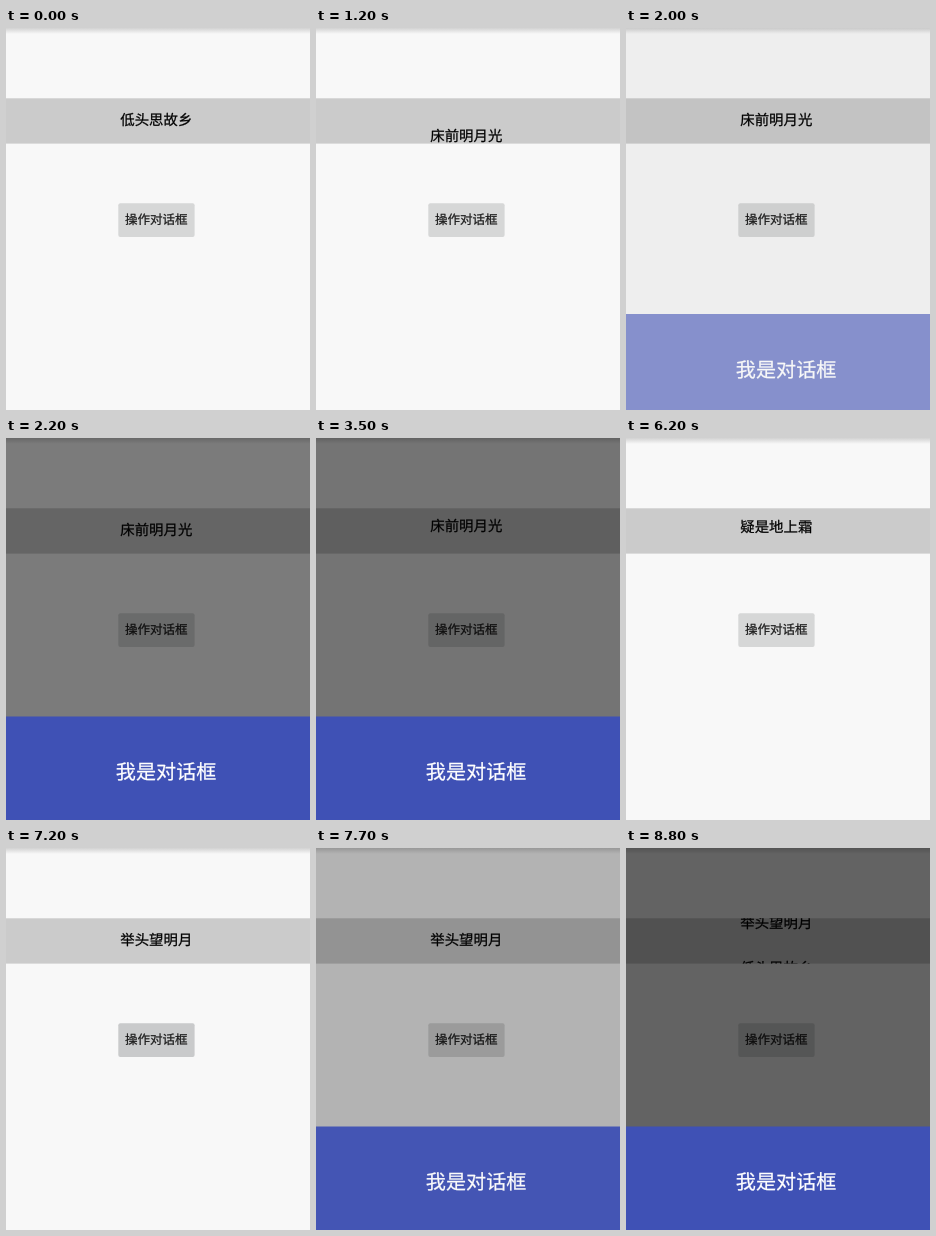
An HTML page with a canvas that plays this animation: 304 by 382 pixels, repeating every 8.9 s.

```html
<!DOCTYPE html>
<html lang="zh-CN">
<head>
<meta charset="utf-8">
<title>对话框</title>
<style>
html, body { margin: 0; width: 100%; height: 100%; overflow: hidden; background: #f8f8f8; }
canvas { display: block; width: 304px; height: 382px; }
</style>
</head>
<body>
<canvas id="stage"></canvas>
<script>
const W = 304, H = 382, LOOP = 8900, TICK = 100;
const BAND = { y: 70.3, h: 45.3 };
const LINES = ['低头思故乡', '床前明月光', '疑是地上霜', '举头望明月'];
const SCROLLS = [[630, 1490], [3425, 4200], [6133, 6990], [8670, 9003]];
const PRESSES = [[1600, 1900], [7200, 7500]];
const DIALOGS = [[1900, 3500], [7500, Infinity]];

// Keys: time since the phase began, dim, dialog opacity, dialog offset
const ENTER = [[-100, 0, 0, 20], [0, 0.01, 0.15, 16], [100, 0.04, 0.594, 7.5],
  [200, 0.28, 0.95, 0], [300, 0.5, 1, 0], [400, 0.6, 1, 0]];
const LEAVE = [[0, 0.53, 1, 0], [100, 0.38, 0.75, 4], [200, 0.2, 0.25, 12],
  [300, 0.07, 0, 20], [400, 0, 0, 20]];

const ratio = window.devicePixelRatio || 1;

function setup(canvas) {
  canvas.width = W * ratio;
  canvas.height = H * ratio;
  const c = canvas.getContext('2d');
  c.scale(ratio, ratio);
  return c;
}

const ctx = setup(document.getElementById('stage'));
const layer = setup(document.createElement('canvas'));

const clamp = v => Math.max(0, Math.min(1, v));

function sample(keys, t) {
  if (t <= keys[0][0]) return keys[0].slice(1);
  for (let i = 1; i < keys.length; i++) {
    const a = keys[i - 1], b = keys[i];
    if (t <= b[0]) {
      const p = (t - a[0]) / (b[0] - a[0]);
      return a.slice(1).map((v, k) => v + (b[k + 1] - v) * p);
    }
  }
  return keys[keys.length - 1].slice(1);
}

function rect(c, x, y, w, h, color) {
  c.fillStyle = color;
  c.fillRect(x, y, w, h);
}

// A hairline outline gives the glyphs a slightly heavier weight
function text(c, str, x, y, size, color) {
  c.font = `${size}px "Noto Sans CJK SC", "Noto Sans CJK", sans-serif`;
  c.textRendering = 'geometricPrecision';
  c.textAlign = 'center';
  c.textBaseline = 'alphabetic';
  c.lineJoin = 'round';
  c.lineWidth = 0.25;
  c.fillStyle = c.strokeStyle = color;
  c.fillText(str, x, y + size * 0.38);
  c.strokeText(str, x, y + size * 0.38);
}

function drawTop() {
  const shade = ctx.createLinearGradient(0, 0, 0, 6);
  shade.addColorStop(0, '#d2d2d2');
  shade.addColorStop(1, '#f8f8f8');
  rect(ctx, 0, 0, W, 6, shade);
}

function drawBand(t) {
  const pos = SCROLLS.reduce((sum, [a, b]) => sum + clamp((t - a) / (b - a)), 0);
  const index = Math.floor(pos), shift = (pos - index) * BAND.h;
  rect(ctx, 0, BAND.y, W, BAND.h, '#cbcbcb');
  ctx.save();
  ctx.beginPath();
  ctx.rect(0, BAND.y, W, BAND.h);
  ctx.clip();
  for (let i = 0; i < 2; i++) {
    const line = LINES[(index + i) % LINES.length];
    text(ctx, line, 150.3, 91.8 - shift + i * BAND.h, 14.4, '#000');
  }
  ctx.restore();
}

function drawButton(t) {
  const pressed = PRESSES.some(([a, b]) => t >= a && t < b);
  ctx.fillStyle = pressed ? '#c9cacb' : '#d6d7d7';
  ctx.beginPath();
  ctx.roundRect(112.3, 175.2, 76.3, 33.8, 2);
  ctx.fill();
  text(ctx, '操作对话框', 150.3, 191.6, 12.55, '#1c1c1c');
}

function drawDialog(t) {
  const shown = DIALOGS.find(([a, b]) => t >= a && t < b + 400);
  if (!shown) return;
  const [open, close] = shown;
  const [dim, alpha, dy] = t >= close ? sample(LEAVE, t - close) : sample(ENTER, t - open);
  rect(ctx, 0, 0, W, H, `rgba(0,0,0,${dim})`);
  layer.clearRect(0, 0, W, H);
  rect(layer, 0, 278.5 + dy, W, 104, '#3f51b5');
  text(layer, '我是对话框', 160.1, 333.4 + dy, 20.1, '#fff');
  ctx.globalAlpha = alpha;
  ctx.drawImage(layer.canvas, 0, 0, W, H);
  ctx.globalAlpha = 1;
}

function draw(t) {
  rect(ctx, 0, 0, W, H, '#f8f8f8');
  drawTop();
  drawBand(t);
  drawButton(t);
  drawDialog(t);
}

const start = performance.now();
function frame() {
  const t = (performance.now() - start) % LOOP;
  draw(Math.floor(t / TICK) * TICK);
  requestAnimationFrame(frame);
}
frame();
</script>
</body>
</html>
```
